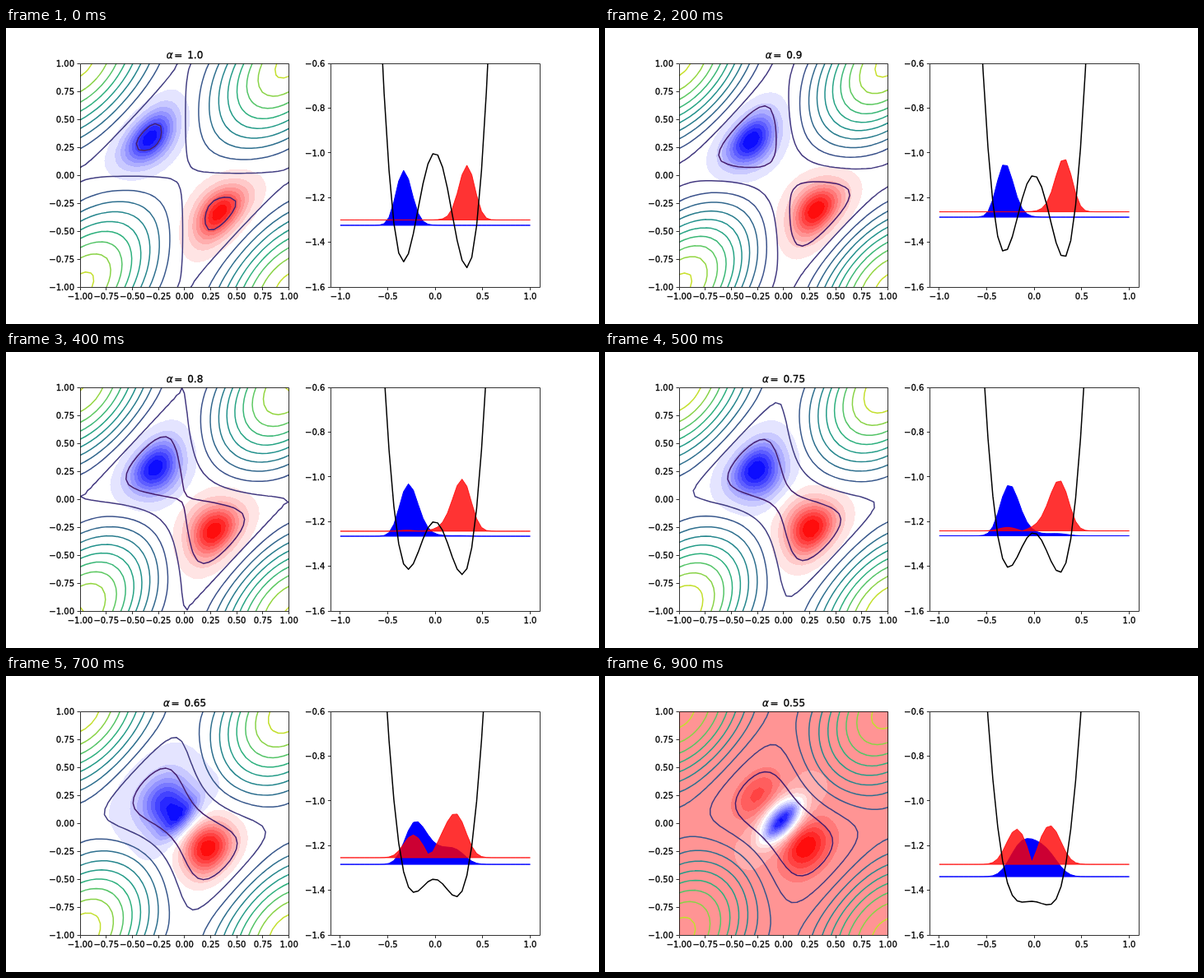
Animation, 720 px wide and 360 px high, one loop 1000 ms. Source, as an HTML page with a canvas:

```html
<!DOCTYPE html>
<html>
<head>
<meta charset="utf-8">
<style>
html, body { margin: 0; width: 100%; height: 100%; overflow: hidden; background: #fff; }
canvas { display: block; }
</style>
</head>
<body>
<canvas id="stage" width="720" height="360"></canvas>
<script>
const W = 720, H = 360, TOP = 43.2, BOTTOM = 315, PANEL = 253.64, LEFT = 90, RIGHT = 394.36;
const N = 39, M = N + 1;            // periodic grid points, plotted points
const EC = 0.0095, TILT = 2 * Math.PI * 0.0024;
const alphas = Array.from({ length: 10 }, (_, i) => 1 - i * 0.05);
const energy = [
  [-1.324, -1.304, -1.2875, -1.274, -1.2654, -1.2635, -1.267, -1.284, -1.308, -1.339],
  [-1.300, -1.280, -1.2636, -1.2505, -1.243, -1.2415, -1.245, -1.254, -1.267, -1.284]
];
const viridis = [[68, 1, 84], [71, 45, 123], [59, 82, 139], [44, 114, 142], [33, 145, 140],
  [40, 174, 128], [94, 201, 98], [173, 220, 48], [253, 231, 37]];

const coord = i => -1 + 2 * i / N;
const potential = (x, y, alpha, tilt) => {
  const a = Math.PI * x, b = Math.PI * y;
  return -Math.cos(a) - Math.cos(b) + alpha * Math.cos(a - b + tilt);
};
const makeGrid = (n, f) => Float64Array.from({ length: n * n }, (_, k) => f(coord(k % n), coord(Math.floor(k / n))));
const dot = (f, g) => { let s = 0; for (let k = 0; k < f.length; k++) s += f[k] * g[k]; return s; };
const mix = (f, p, g, q) => f.map((v, k) => p * v + q * g[k]);
const normalize = f => { const s = 1 / Math.sqrt(dot(f, f)); return f.map(v => v * s); };

// ---- two lowest states of the two-phase Hamiltonian ----
function hamiltonian(f, U, alpha) {
  const h = 2 * Math.PI / N, a = 2 * EC, b = a / (1 + 2 * alpha);
  const c = (a + b) / (h * h), d = (a - b) / (2 * h * h);
  const out = new Float64Array(N * N);
  for (let j = 0; j < N; j++) {
    const row = j * N, up = (j + 1) % N * N, dn = (j + N - 1) % N * N;
    for (let i = 0; i < N; i++) {
      const r = i + 1 < N ? i + 1 : 0, l = i ? i - 1 : N - 1, k = row + i;
      out[k] = (U[k] + 4 * c) * f[k] - c * (f[row + r] + f[row + l] + f[up + i] + f[dn + i])
        - d * (f[up + r] + f[dn + l] - f[up + l] - f[dn + r]);
    }
  }
  return out;
}

let states = null;
function solve(alpha) {
  const U = makeGrid(N, (x, y) => potential(x, y, alpha, -TILT));
  if (!states) {
    const u = U.map(v => Math.exp(-3 * v));
    const s = makeGrid(N, (x, y) => Math.sin(Math.PI * (x - y)));
    states = [u, u.map((v, k) => v * s[k])];
  }
  let [u, v] = states;
  const relax = f => mix(f, 1, hamiltonian(f, U, alpha), -0.13);
  for (let n = 0; n < 350; n++) {
    u = normalize(relax(u));
    v = relax(v);
    v = normalize(mix(v, 1, u, -dot(u, v)));
  }
  const hu = hamiltonian(u, U, alpha), hv = hamiltonian(v, U, alpha);
  const t = Math.atan2(2 * dot(u, hv), dot(u, hu) - dot(v, hv)) / 2;
  const c = Math.cos(t), s = Math.sin(t);
  states = [mix(u, -s, v, c), mix(u, c, v, s)];
  return states.map(f => Float64Array.from({ length: M * M },
    (_, k) => Math.abs(f[Math.floor(k / M) % N * N + k % M % N])));
}

// ---- drawing helpers ----
const leftX = x => LEFT + PANEL * (x + 1) / 2;
const leftY = y => BOTTOM - (BOTTOM - TOP) * (y + 1) / 2;
const rightX = x => RIGHT + PANEL * (x + 1.1) / 2.2;
const rightY = v => TOP + (BOTTOM - TOP) * (-0.6 - v);

function ramp(t) {
  const p = t * 8, i = Math.min(7, Math.floor(p));
  return `rgb(${viridis[i].map((c, k) => Math.round(c + (viridis[i + 1][k] - c) * (p - i)))})`;
}

function label(g, s, x, y, align = "left", font = "10px") {
  g.font = font + ' "DejaVu Sans", sans-serif';
  g.textAlign = align;
  g.lineWidth = 0.3;
  g.fillStyle = g.strokeStyle = "#000";
  g.fillText(s, x, y);
  g.strokeText(s, x, y);
}

function axes(g, x0, xs, ys, toX, toY, digits) {
  const fmt = v => v.toFixed(digits).replace("-", "\u2212");
  const snap = v => Math.floor(v) + 0.5;
  g.strokeStyle = "#000";
  g.lineWidth = 0.8;
  g.beginPath();
  g.rect(snap(x0), 43.5, snap(x0 + PANEL) - snap(x0), 272);
  for (const x of xs) { g.moveTo(snap(toX(x)), 315.5); g.lineTo(snap(toX(x)), 319); }
  for (const y of ys) { g.moveTo(x0 - 3.5, snap(toY(y))); g.lineTo(x0, snap(toY(y))); }
  g.stroke();
  for (const x of xs) label(g, fmt(x), toX(x), 329.8, "center");
  for (const y of ys) label(g, fmt(y), x0 - 7, toY(y) + 3.8, "right");
}

function bands(g, f) {
  const lo = Math.min(...f), hi = Math.max(...f), w = 254, h = 272;
  const img = g.createImageData(w, h);
  for (let py = 0, k = 0; py < h; py++) {
    const v = Math.min(N, Math.max(0, (271.3 - py) / 271.8 * N)), j = Math.min(N - 1, Math.floor(v)), b = v - j;
    for (let px = 0; px < w; px++, k += 4) {
      const u = Math.min(N, (px + 0.5) / PANEL * N), i = Math.min(N - 1, Math.floor(u)), a = u - i, n = j * M + i;
      const z = (1 - b) * ((1 - a) * f[n] + a * f[n + 1]) + b * ((1 - a) * f[n + M] + a * f[n + M + 1]);
      const q = Math.max(0, Math.min(18, Math.floor((z - lo) / (hi - lo) * 19)));
      const t = (q + 0.5) / 19;
      img.data[k] = 255 * Math.min(1, 2 * t);
      img.data[k + 1] = 255 * (1 - Math.abs(2 * t - 1));
      img.data[k + 2] = 255 * Math.min(1, 2 - 2 * t);
      img.data[k + 3] = 255;
    }
  }
  g.putImageData(img, LEFT, 43);
}

// marching squares
function isoline(g, f, level) {
  const ring = [[0, 0], [1, 0], [1, 1], [0, 1]];
  g.beginPath();
  for (let j = 0; j < N; j++) for (let i = 0; i < N; i++) {
    const z = ring.map(([a, b]) => f[(j + b) * M + i + a] - level), pts = [];
    for (let e = 0; e < 4; e++) {
      const n = (e + 1) % 4;
      if (z[e] > 0 === z[n] > 0) continue;
      const t = z[e] / (z[e] - z[n]), [a, b] = ring[e], [c, d] = ring[n];
      pts.push([leftX(coord(i + a + (c - a) * t)), leftY(coord(j + b + (d - b) * t))]);
    }
    if (pts.length === 4 && (z[0] + z[1] + z[2] + z[3] > 0) !== z[0] > 0) pts.push(pts.shift());
    // pairing keeps the corners that differ from the cell centre apart
    if (pts.length === 4 && (z[0] + z[1] + z[2] + z[3] > 0) === z[0] > 0) {
      /* corners 1 and 3 are cut off: edges 0-1 and 2-3 */
    }
    for (let p = 0; p + 1 < pts.length; p += 2) {
      g.moveTo(...pts[p]);
      g.lineTo(...pts[p + 1]);
    }
  }
  g.stroke();
}

function contours(g, V) {
  const min = Math.min(...V), max = Math.max(...V), unit = 1 / (4 * Math.PI);
  const step = ((max - min) / 11 > 5 * unit ? 6 : 5) * unit;
  const lo = Math.floor(min / step), hi = Math.ceil(max / step);
  g.lineWidth = 1.5;
  g.lineCap = "round";
  for (let k = lo + 1; k < hi; k++) {
    g.strokeStyle = ramp((k - lo) / (hi - lo));
    isoline(g, V, k * step);
  }
  g.lineCap = "butt";
}

const slice = f => Array.from({ length: M }, (_, i) => f[(N - i) * M + i]);

function hump(g, values, base, color) {
  g.beginPath();
  g.moveTo(rightX(-1), rightY(base));
  values.forEach((v, i) => g.lineTo(rightX(coord(i)), rightY(base + v)));
  g.lineTo(rightX(1), rightY(base));
  g.closePath();
  g.fillStyle = g.strokeStyle = color;
  g.lineWidth = 1;
  g.fill();
  g.stroke();
}

function clipped(g, x0, draw) {
  g.save();
  g.beginPath();
  g.rect(x0, TOP, PANEL, BOTTOM - TOP);
  g.clip();
  draw();
  g.restore();
}

const range = (a, step, n) => Array.from({ length: n }, (_, i) => a + i * step);
let scale = 0;

function render(alpha, n) {
  const cv = document.createElement("canvas");
  cv.width = W;
  cv.height = H;
  const g = cv.getContext("2d");
  g.lineJoin = "round";
  g.fillStyle = "#fff";
  g.fillRect(0, 0, W, H);

  const [ground, excited] = solve(alpha);
  scale = scale || 0.246 / Math.max(...ground);
  const V = makeGrid(M, (x, y) => potential(x, y, alpha, TILT));

  bands(g, excited.map((v, k) => v - ground[k]));
  clipped(g, LEFT, () => contours(g, V));
  clipped(g, RIGHT, () => {
    hump(g, slice(ground).map(v => v * scale), energy[0][n], "rgb(0,0,255)");
    hump(g, slice(excited).map(v => v * scale), energy[1][n], "rgba(255,0,0,0.8)");
    g.beginPath();
    slice(V).forEach((v, i) => g.lineTo(rightX(coord(i)), rightY(v)));
    g.strokeStyle = "#000";
    g.lineWidth = 1.5;
    g.stroke();
  });

  axes(g, LEFT, range(-1, 0.25, 9), range(-1, 0.25, 9), leftX, leftY, 2);
  axes(g, RIGHT, range(-1, 0.5, 5), range(-1.6, 0.2, 6), rightX, rightY, 1);

  const value = n ? String(+alpha.toFixed(2)) : "1.0";
  const x = 217 - (25.5 + (value.length > 3 ? 26.7 : 19.1)) / 2;
  label(g, "\u03b1", x, 37.2, "left", "italic 12px");
  label(g, "=", x + 9.6, 37.2, "left", "12px");
  label(g, value, x + 25.5, 37.2, "left", "12px");
  return cv;
}

const pictures = alphas.map(render);
const stage = document.getElementById("stage").getContext("2d");
function play() {
  stage.drawImage(pictures[Math.floor(performance.now() % 1000 / 100)], 0, 0);
  requestAnimationFrame(play);
}
play();
</script>
</body>
</html>
```
